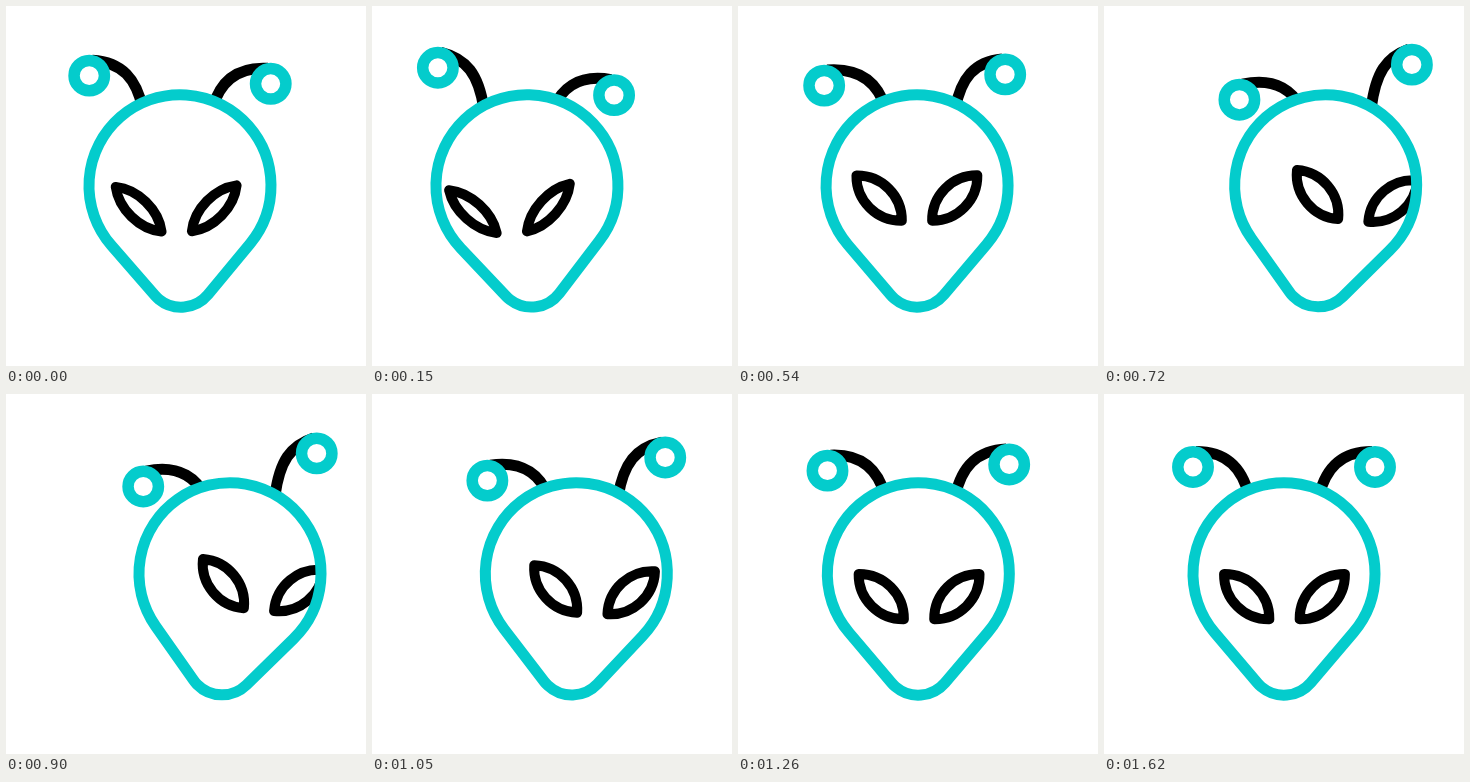
An HTML page with a canvas that plays this animation: 360x360 px, repeating every 1.65 s.

```html
<!DOCTYPE html>
<html lang="en">
<head>
<meta charset="utf-8">
<title>Alien</title>
<style>
  html, body { margin: 0; width: 100%; height: 100%; overflow: hidden; background: #fff; }
  canvas { display: block; width: 360px; height: 360px; }
</style>
</head>
<body>
<canvas id="stage" width="360" height="360"></canvas>
<script>
const ctx = document.getElementById('stage').getContext('2d');
const TEAL = '#04cccc', BLACK = '#000', WHITE = '#fff';
const LOOP = 1650, STEP = 30;
const RAD = Math.PI / 180;

// Eased progress from 0 to 1 between two times
function ease(t, from, to) {
  const u = Math.min(1, Math.max(0, (t - from) / (to - from)));
  return (1 - Math.cos(Math.PI * u)) / 2;
}

// Head: swing left, across to the right, then home; the antennas sway ahead of it
const turn = t =>
  -35.5 * ease(t, -111, 300) + 82.5 * ease(t, 332, 796) - 47 * ease(t, 825, 1285);
const sway = t =>
  -14.6 * ease(t, -110, 200) + 32.6 * ease(t, 240, 760) - 18 * ease(t, 780, 1440);
const drift = t => -2.6 * (ease(t, 0, 360) - ease(t, 500, 720));
const lift = t => -13.5 * (ease(t, 360, 620) - ease(t, 820, 1280));
const openness = t => 1 - 0.7 * Math.sin(Math.PI * Math.min(1, (t + 22) / 200));

function stroke(color, width) {
  ctx.strokeStyle = color;
  ctx.lineWidth = width;
  ctx.stroke();
}

// Two circles joined by their common tangents
function headPath() {
  const big = 91, small = 35, gap = 86.5;
  const a = Math.asin((big - small) / gap);
  ctx.beginPath();
  ctx.arc(0, 0, big, Math.PI - a, a);
  ctx.arc(0, gap, small, a, Math.PI - a);
  ctx.closePath();
}

// side: -1 left, 1 right
function antenna(side, cx, s, shift) {
  const bx = cx + shift + side * (91 - 0.0155 * s * s);
  const by = 73 - side * s + 0.18 * Math.abs(s);
  const x0 = bx - side * 3, y0 = by - 15.5;
  const x1 = cx + side * 35 + s * 0.6, y1 = 102;
  const dx = x1 - x0, dy = y1 - y0;

  ctx.beginPath();
  ctx.moveTo(x0, y0);
  ctx.bezierCurveTo(x0 + dx * 0.6, y0 + side * s * 0.45,
    x1 - dx * 0.12, y1 - dy * 0.6, x1, y1);
  stroke(BLACK, 11);

  ctx.beginPath();
  ctx.arc(bx, by, 15.2, 0, Math.PI * 2);
  ctx.fillStyle = WHITE;
  ctx.fill();
  stroke(TEAL, 11.5);
}

function eye(side, open) {
  const half = 32, handle = 14.4, bulge = 18 * open;
  ctx.save();
  ctx.translate(side * 37.8, 0);
  ctx.rotate(-side * Math.PI / 4);
  ctx.beginPath();
  ctx.moveTo(-half, 0);
  ctx.bezierCurveTo(-handle, -bulge, handle, -bulge, half, 0);
  ctx.bezierCurveTo(handle, bulge, -handle, bulge, -half, 0);
  ctx.closePath();
  stroke(BLACK, 10);
  ctx.restore();
}

function draw(t) {
  const dx = turn(t), s = sway(t), shift = drift(t), open = openness(t);
  const cx = 180 + dx;
  ctx.fillStyle = WHITE;
  ctx.fillRect(0, 0, 360, 360);
  ctx.lineJoin = 'round';

  antenna(-1, cx, s, shift);
  antenna(1, cx, s, shift);

  ctx.save();
  ctx.translate(cx, 179.7);
  ctx.rotate(dx * 0.12 * RAD);
  headPath();
  ctx.fillStyle = WHITE;
  ctx.fill();

  ctx.save();
  ctx.clip();
  ctx.translate(0.5 + dx * 0.72, 23 + lift(t));
  eye(-1, open);
  eye(1, open);
  ctx.restore();

  headPath();
  stroke(TEAL, 11);
  ctx.restore();
}

const start = performance.now();
function tick() {
  const t = (performance.now() - start) % LOOP;
  draw(Math.floor(t / STEP) * STEP);
  requestAnimationFrame(tick);
}
tick();
</script>
</body>
</html>
```
